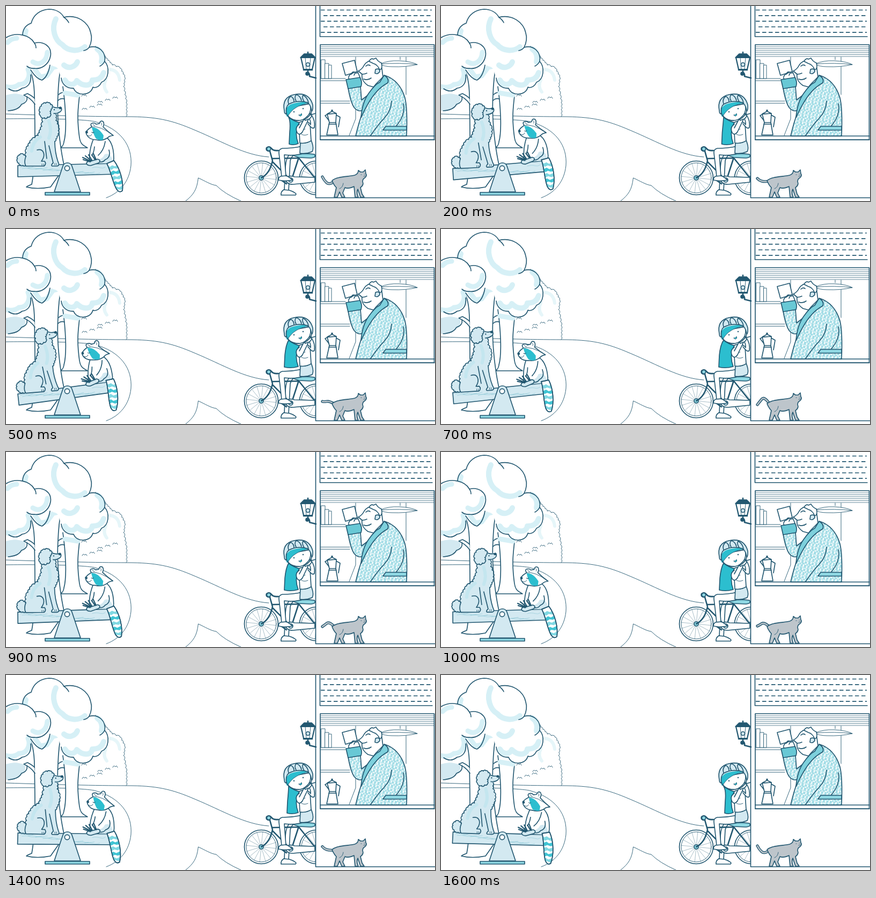
Write an HTML page that moves like this. It is 800 px wide and 363 px high and loops after 1.7 s.

```html
<!DOCTYPE html>
<html lang="en">
<head>
<meta charset="utf-8">
<title>Seesaw afternoon</title>
<style>
html, body { margin: 0; width: 100%; height: 100%; overflow: hidden; background: #fff; }
svg { display: block; width: 100vw; height: 100vh; }
.o { stroke: #235871; stroke-width: 1.65; fill: none; stroke-linecap: round; stroke-linejoin: round; }
.t { stroke-width: .9; }
.b { stroke-width: 2.6; }
.w { fill: #fff; }
.l { fill: #d3e9f1; }
.m { fill: #8fd8e3; }
.c { fill: #2cbecf; }
.d { fill: #235871; }
.g { fill: #bdc5cb; }
.s { fill: none; stroke: #d6f0f6; stroke-linecap: round; stroke-linejoin: round; }
</style>
</head>
<body>
<svg id="stage" viewBox="0 0 800 363" preserveAspectRatio="none"></svg>
<script>
const LOOP = 1700, STEP = 100;
const stage = document.getElementById('stage');
const P = (cls, d, extra = '') => `<path class="${cls}" d="${d}" ${extra}/>`;
const C = (cls, x, y, r) => `<circle class="${cls}" cx="${x}" cy="${y}" r="${r}"/>`;
const R = (cls, x, y, w, h) => `<rect class="${cls}" x="${x}" y="${y}" width="${w}" height="${h}"/>`;
const rep = (n, f) => Array.from({ length: n }, (_, i) => f(i)).join('');

// Scalloped line through a few corner points
function fur(pts, size) {
  let d = `M${pts[0]} ${pts[1]}`;
  for (let i = 2; i < pts.length; i += 2) {
    const dx = pts[i] - pts[i - 2], dy = pts[i + 1] - pts[i - 1];
    const len = Math.hypot(dx, dy), n = Math.max(1, Math.round(len / size));
    const r = (len / n * .6).toFixed(2);
    d += rep(n, () => `a${r} ${r} 0 0 1 ${(dx / n).toFixed(2)} ${(dy / n).toFixed(2)}`);
  }
  return d;
}

const defs = `<defs>
  <pattern id="plaid" width="13" height="14" patternUnits="userSpaceOnUse" patternTransform="rotate(12)">
    <rect width="13" height="14" fill="#a3dde6"/>
    <path d="M3 0V5M3 8V13M9.5 1V6M9.5 9V14M4.5 7H8M11 7.5H14.5M-1 13.5H1.5M5 .5H8" stroke="#fff" stroke-width="2.2"/>
  </pattern>
  <clipPath id="outside"><rect width="577.5" height="363"/></clipPath>
  <clipPath id="tailClip"><path id="tailShape" d="M188 291C193 306 192 330 197 342Q201 350 207 346C212 330 211 306 202 288Z"/></clipPath>
</defs>`;

const hills =
  P('o t', 'M0 201C90 204 170 206 225 206C280 206 308 212 352 231C405 253 445 278 490 281') +
  P('o t', 'M0 210C80 209 145 211 165 215C214 228 236 260 233 297C230 327 212 348 187 357') +
  P('o t', 'M335 363C350 351 356 342 358.500 320C370 325 382 333 392 334Q408 350 438 363');

const bush =
  P('o t w', fur([166, 75, 186, 97, 198, 110, 213, 116, 221, 132, 219, 150, 224, 180, 224, 206], 7)) +
  P('s', 'M194 118Q210 120 212 138M186 138Q180 150 188 160', 'stroke-width="6" opacity=".6"') +
  rep(7, i => P('o t', `M${141 + (i * 29) % 72} ${168 + (i * 17) % 30}q2 -5 5 -1q2 -4 4 1`));

const bigCrown = 'M31 59C30 45 35 36 47 32C51 16 64 7 80 6C93 6 103 12 108 21C134 15 154 31 158 50C161 60 159 69 155 77C173 72 187 86 184 103C194 114 192 137 178 142C174 151 166 153 162 151C158 168 131 168 126 153C114 154 104 146 103 134';
const leftCrown = 'M0 59C18 48 44 53 53 69C70 65 86 75 83 93C80 109 66 118 53 116Q45 117 39 112';
const trees =
  // rear trunk
  P('o w', 'M106 150C111 185 114 232 108 253C107 260 105 261 102 264H152C146 260 139 259 137 245C132 210 134 190 138 160') +
  P('s', 'M110 162L134 166', 'stroke-width="9"') +
  // front trunk
  P('o w', 'M40 112C50 125 53 145 53 170C54 220 56 290 48 332Q40 335 38 337Q58 342 83 337L109 300C101 265 94 210 97 165Q98 135 103 108') +
  P('s', 'M54 118L64 132L76 130L88 114L98 112', 'stroke-width="9"') +
  P('o w', 'M54 183Q46 171 33 166L40 163Q50 168 53 172') +
  P('o w', 'M97 176Q102 171 109 173M98 165Q101 162 105 161') +
  P('l', 'M0 166Q18 160 34 167Q41 178 27 184Q18 195 0 195Z') +
  P('o', 'M39 169Q41 179 29 183Q23 194 4 195') +
  P('w', bigCrown + 'C98 122 100 114 88 112L45 92Z') +
  P('s', 'M37 46Q34 52 36 58M93 24C84 42 91 64 105 72C115 84 135 86 147 76M108 110C118 119 130 112 133 104M170 80Q182 88 178 104M110 138C116 149 128 148 132 139C145 152 160 148 161 138Q178 138 182 124', 'stroke-width="10"') +
  P('o', bigCrown) +
  P('o', 'M108 21Q114 25 117 31M155 77Q151 82 145 83M184 103Q181 109 175 112') +
  P('w', leftCrown + 'C53 130 46 150 30 153Q18 163 5 158L0 150Z') +
  P('s', 'M77 86C76 104 62 112 50 104M41 118C47 132 38 147 24 146Q14 154 0 150M3 68Q10 60 20 60', 'stroke-width="9"') +
  P('o', leftCrown) +
  P('o', 'M46 128C48 144 40 152 30 153Q18 163 5 154M53 69Q56 73 56 78') +
  P('o', 'M46 119Q57 136 67 138Q78 132 82 110');

const plank =
  P('o l', 'M22 297L203 293L205 313L22 318Z') +
  rep(12, i => P('o', `M${27 + (i * 53) % 145} ${300 + (i * 5) % 13}q8 -2 14 0t${10 + i % 4 * 4} -1`, 'style="stroke-width:.6;stroke:#8cc7d6"')) +
  P('o t', 'M199 293L201 313');

const stand =
  P('o l', 'M90 346L106 298C109 290 120 290 123 298L139 346Z') +
  C('o w', 114, 302, 4.6) +
  P('o m', 'M73 347H156V352H73Z');

const dog =
  P('l', 'M64 203C60 188 68 180 78 180Q87 180 89 188L103 188Q105 198 95 201L92 208Q99 222 97 235L90 260L97 290Q101 296 96 298H34Q20 294 21 282Q28 274 37 279Q37 262 48 248Q65 238 69 207Z') +
  P('o l', fur([36, 297, 27, 296, 21, 289, 22, 280, 29, 275, 37, 280], 5)) +
  P('o', fur([37, 280, 38, 266, 48, 249, 60, 241, 67, 224, 70, 207], 7)) +
  P('o l', fur([72, 208, 64, 204, 63, 191, 69, 182, 79, 180, 87, 187], 6)) +
  P('o', fur([86, 188, 82, 196, 83, 204, 72, 209], 5)) +
  P('o', 'M88 188Q96 191 102 188Q106 193 101 197Q95 201 89 200') +
  '<ellipse class="d" cx="101.5" cy="190" rx="2.8" ry="2"/>' + C('d', 90, 193, 1.2) +
  P('o', fur([93, 202, 93, 213, 98, 226, 97, 238, 91, 252], 6)) +
  P('s', 'M64 244Q50 252 48 270M80 214Q86 232 80 246', 'stroke-width="6" style="stroke:#c4e6ef"') +
  P('o l', 'M91 252Q91 272 97 290Q101 297 95 298H86Q83 296 88 292L80 260') +
  P('o', 'M72 252L76 284M58 268C70 265 75 277 66 289H72Q76 294 71 298H37Q33 291 37 280') +
  P('o t', 'M91 296v-3M94 296v-3M67 297v-3M70 297v-3');

const raccoon =
  P('o w', 'M163 248C157 262 155 278 156 291H192Q201 292 201 284C201 262 196 250 186 244Z') +
  P('l', 'M158 285Q178 290 184 276Q196 272 199 288L194 293H158Z') +
  P('o', 'M172 290Q181 292 185 286Q196 282 192 268M165 262Q164 273 160 278M185 252Q183 268 172 278') +
  P('o w', 'M149 234Q154 228 160 225Q156 219 161 218Q166 217 168 220L174 219Q176 212 181 215Q184 219 181 225Q190 234 200 241Q192 242 190 245Q180 252 168 249Q155 249 150 239Z') +
  P('c', 'M160 226Q172 225 182 241L181 249Q174 251 168 247Q163 240 160 226Z') +
  P('o t', 'M160 225Q175 222 200 241M162 220Q163 223 166 223M177 217Q180 219 178 222M152 241Q158 244 160 239') +
  C('d', 150.5, 235, 2.4) + P('o', 'M160 235q2 2 4 0', 'style="stroke-width:1.1"') +
  P('o l', 'M150 293Q151 288 158 289L171 285Q178 287 173 292L158 297Q151 297 150 293Z') +
  P('o', 'M160 287L154 277M159 288L148 279M158 289L143 282M157 290L144 286M168 286L163 275M166 286L160 277', 'style="stroke-width:2.2"');

const tail = '<use href="#tailShape" class="o w"/><g clip-path="url(#tailClip)">' +
  rep(5, i => P('c', `M186 ${296 + i * 10}l7 2l4 -2l5 3l12 -4v6l-9 3l-6 -2l-4 2l-9 -3z`, `opacity="${.6 + i % 2 * .3}"`)) +
  '</g><use href="#tailShape" class="o" style="fill:none"/>';

const wheel = x => C('o w', x, 320, 31.5) + C('o t', x, 320, 28) +
  rep(16, i => {
    const a = i * Math.PI / 8 + .1;
    return `<line class="o" style="stroke-width:.4" x1="${x}" y1="320" x2="${x + 28 * Math.cos(a)}" y2="${320 + 28 * Math.sin(a)}"/>`;
  }) + C('o m', x, 320, 4);

const bike = wheel(476) + wheel(579) +
  P('o b', 'M476 320Q492 312 497 288L492 270M497 284L546 283M498 291L532 325L546 282M532 325H580L546 283') +
  P('o b', 'M492 270Q484 270 486 264Q491 260 495 265Q498 270 508 269') + C('o m', 490, 266, 3.6) +
  P('o w', 'M520 321Q528 314 538 318L576 319V328L535 332Q522 332 520 321Z') + C('o l', 531, 324, 4);

const girlBack = P('o w', 'M555 268C540 272 533 278 530 288L527 344L519 343L521 300Q522 282 531 273L552 259') +
  P('o w', 'M518 342L528 343Q538 346 541 350L540 352H513Q512 346 518 342Z') +
  P('o b', 'M523 331L513 324');

const girlFront =
  P('o m', 'M535 278Q553 273 575 276Q580 282 568 283L546 282Z') +
  P('o w', 'M553 261Q534 265 515 265Q508 267 509 274L514 317L522 317L519 277Q540 280 563 272Z') +
  P('o w', 'M512 317L522 316Q530 319 534 324Q520 327 508 324Q508 319 512 317Z') +
  P('o l', 'M549 254L569 250Q575 264 571 271Q560 276 548 274Z') +
  P('o w', 'M546 217Q558 211 567 219L569 251Q558 257 548 255Z') +
  P('o t', 'M550 229q4 3 8 0M551 239q6 3 12 0');

const arm =
  P('o w', 'M547 220Q538 226 543 236Q548 242 553 234L564 211L558 206L547 227') +
  P('o w', 'M563 219Q572 231 575 226Q577 213 569 202L562 201L565 208Q569 216 568 221') +
  P('o w', 'M554 208Q555 202 561 202L569 200Q572 205 566 210L558 213Z') +
  P('o', 'M567 203L577 200');

const head =
  P('o w', 'M523 190Q521 207 537 212Q551 216 560 207Q571 198 567 182Z') +
  P('c', 'M523 205Q519 189 531 183Q547 177 565 180Q549 184 541 189Q531 195 525 206Z') +
  P('o t', 'M525 206Q531 195 541 189Q550 183 565 181') +
  P('o l', 'M519 195Q514 170 537 165Q565 159 572 184Q573 193 570 196Q569 186 563 180Q543 174 527 183Q521 188 523 201Q519 201 519 195Z') +
  P('o', 'M527 182Q524 173 531 168Q537 171 537 178M541 177Q537 170 541 165Q549 167 551 176M556 178Q551 170 554 166Q562 170 564 180') +
  P('o', 'M523 200Q528 213 546 213M570 196Q567 206 557 211') +
  '<g id="open">' + C('d', 537, 197, 1.2) + C('d', 554, 191, 1.2) + '</g>' +
  '<g id="shut">' + P('o t', 'M534 196q3 3 6 0M551 191q3 3 6 -1') + '</g>' +
  P('o c t', 'M546 203Q549 204 551 200Q553 204 549 205Z');

const lamp =
  P('o w', 'M550 96H576L571 118H555Z', 'style="stroke-width:2.2"') +
  P('o d', 'M549 96L556 89H570L577 96Z') + P('o b', 'M563 89V86M555 119H571') +
  P('o t', 'M558 96L560 118M568 96L566 118') + C('o l', 563, 109, 3.5) +
  P('o b', 'M563 119V123Q567 126 566 131L578 134') + C('o d', 562, 126, 3);

const house =
  P('o', 'M577.5 0V357H800') + P('o', 'M585.5 0V57H795') +
  rep(5, i => `<line class="o" style="stroke-linecap:butt" x1="${587 + i % 2 * 5}" x2="794" y1="${7.5 + i * 10.4}" y2="${7.5 + i * 10.4}" stroke-dasharray="7.5 4.5"/>`) +
  R('o w', 586, 72, 212.5, 177) +
  rep(6, i => P('o', `M587 ${76 + i * 3.6}H798`, 'style="stroke-width:.7"')) +
  P('o t', 'M652 95V210L640 241M746 95V165M735 95V100M587 135H633M587 139H633M587 177H641M587 181H641') +
  R('o t w', 588, 100, 7, 35) + R('o t w', 595, 107, 7, 28) + R('o t w', 602, 110, 5, 25) +
  P('o t w', 'M697 108Q713 101 733 102Q756 103 767 109Q745 114 720 113Q705 113 697 108Z') +
  P('o t', 'M697 108Q735 105 767 109');

const pot =
  P('o w', 'M599 201L616 200L615 217L619 240H598L603 217Z') +
  P('o w', 'M599 201L608 196L616 200Z') + C('d', 608, 194.5, 1.8) +
  P('o', 'M599 202L595 204L602 213M616 203L623 207L620 225M603 217H615M602 220H616');

const man =
  P('o w', 'M664 127L657 121Q664 118 668 110Q674 101 685 101Q698 101 701 117Q702 125 703 132L690 152L675 148Q662 139 664 127Z') +
  P('o w', 'M677 103Q681 96 685 99L690 97Q693 103 700 106Q703 117 697 119Q693 109 685 107Z') +
  P('o', 'M664 127Q669 127 673 125M667 136Q675 139 681 134M671 112q4 -4 8 -1') +
  P('o l', 'M689 118Q697 115 697 122Q693 128 688 125Z') +
  P('o w', 'M639 136Q638 128 645 126Q650 121 656 123L661 135Z') +
  P('o w', 'M627 107L650 101L655 122L633 129Z') + P('o', 'M644 127q2 -6 6 -4M649 129q2 -6 6 -4') +
  P('o', 'M638 153Q643 181 650 190Q663 203 675 184L693 152L663 175L661 150Z', 'style="fill:url(#plaid)"') +
  P('o', 'M634 137L660 133Q665 141 662 150L638 154Z', 'style="fill:#68c8d5"') +
  P('o', 'M652 242Q658 216 665 198Q673 165 690 145L706 129Q734 138 744 171Q749 191 747 242Z', 'style="fill:url(#plaid)"') +
  P('o', 'M697 142L705 129Q715 134 712 143Q699 150 689 162Q676 177 662 208Q664 180 676 163Q688 146 697 142Z', 'style="fill:#7dd0dc"') +
  P('o', 'M719 177Q718 195 706 208Q693 222 680 241M741 182Q745 204 727 224') +
  P('o m', 'M708 224H747V231H703Z') +
  P('o', 'M586 242H799M586 249H799');

const cat =
  '<path id="catTailA" class="o" style="stroke-width:5.2"/><path id="catTailB" class="o" style="stroke:#bdc5cb;stroke-width:2.4"/>' +
  P('o g', 'M608 325C617 317 637 318 650 315Q657 313 657 306L661 309H666L670 305L671 312Q674 316 669 320Q665 322 665 327Q668 333 661 338L664 350L668 356H661L656 341Q653 347 657 356H651L649 336Q638 341 632 338L628 348L632 356H626L622 346L618 356H612L616 338Q611 333 608 325Z') +
  P('o t', 'M662 314h1M668 313h1M667 317l3 -1M622 340Q628 338 629 330');

stage.innerHTML = defs + hills + bush + trees +
  `<g id="saw">${plank}<g id="dog">${dog}</g>${raccoon}</g>` + stand + `<g id="tail">${tail}</g>` +
  `<g clip-path="url(#outside)">${girlBack}${bike}${girlFront}<path id="hair" class="o c"/>${arm}${head}</g>` +
  lamp + house + pot + man + cat;

const el = Object.fromEntries(['saw', 'dog', 'tail', 'hair', 'open', 'shut', 'catTailA', 'catTailB']
  .map(id => [id, document.getElementById(id)]));

// Cosine-eased value between times that wrap around the loop
const TIMES = [0, 300, 500, 700, 900, 1200, 1600, LOOP];
function track(vals, t) {
  const i = TIMES.findIndex((_, k) => t < TIMES[k + 1]);
  const k = (t - TIMES[i]) / (TIMES[i + 1] - TIMES[i]);
  const a = vals[i], b = vals[(i + 1) % vals.length];
  return a + (b - a) * (1 - Math.cos(Math.PI * k)) / 2;
}

const TILT = [0, -4.7, -6.2, -4.7, -.7, .8, 3];
const SWING = [-11, 0, 0, 0, -9, -13, 3];
const HAIR = [528, 522, 519, 518, 519, 519, 529];
const TIP = [318, 322, 321, 327, 325, 321, 318];
const MID = [331, 327, 323, 319, 321, 323, 331];

function draw(t) {
  const tilt = track(TILT, t), a = tilt * Math.PI / 180;
  el.saw.setAttribute('transform', `rotate(${tilt} 114 302)`);
  el.dog.setAttribute('transform', `rotate(${-tilt * .25} 65 297)`);
  // The tail hangs from the tilted end of the plank
  const dx = 85 * Math.cos(a) + 10 * Math.sin(a) - 85;
  const dy = 85 * Math.sin(a) - 10 * Math.cos(a) + 10;
  el.tail.setAttribute('transform', `translate(${dx} ${dy}) rotate(${track(SWING, t)} 200 292)`);

  const x = track(HAIR, t);
  el.hair.setAttribute('d', `M527 207Q${x + 3} 215 ${x + 1} 235L${x} 257Q${(x + 545) / 2} 260 545 256Q537 236 547 217Q536 214 527 207Z`);
  const blink = t >= 1100 && t < 1300;
  el.open.style.display = blink ? 'none' : '';
  el.shut.style.display = blink ? '' : 'none';

  const tip = track(TIP, t), mid = track(MID, t);
  const d = `M590 ${tip}Q593 ${(tip + mid) / 2} 598 ${mid - 2}T613 326`;
  el.catTailA.setAttribute('d', d);
  el.catTailB.setAttribute('d', d);
}

function frame() {
  const t = performance.now() % LOOP;
  draw(Math.floor(t / STEP) * STEP);
  requestAnimationFrame(frame);
}
frame();
</script>
</body>
</html>
```
